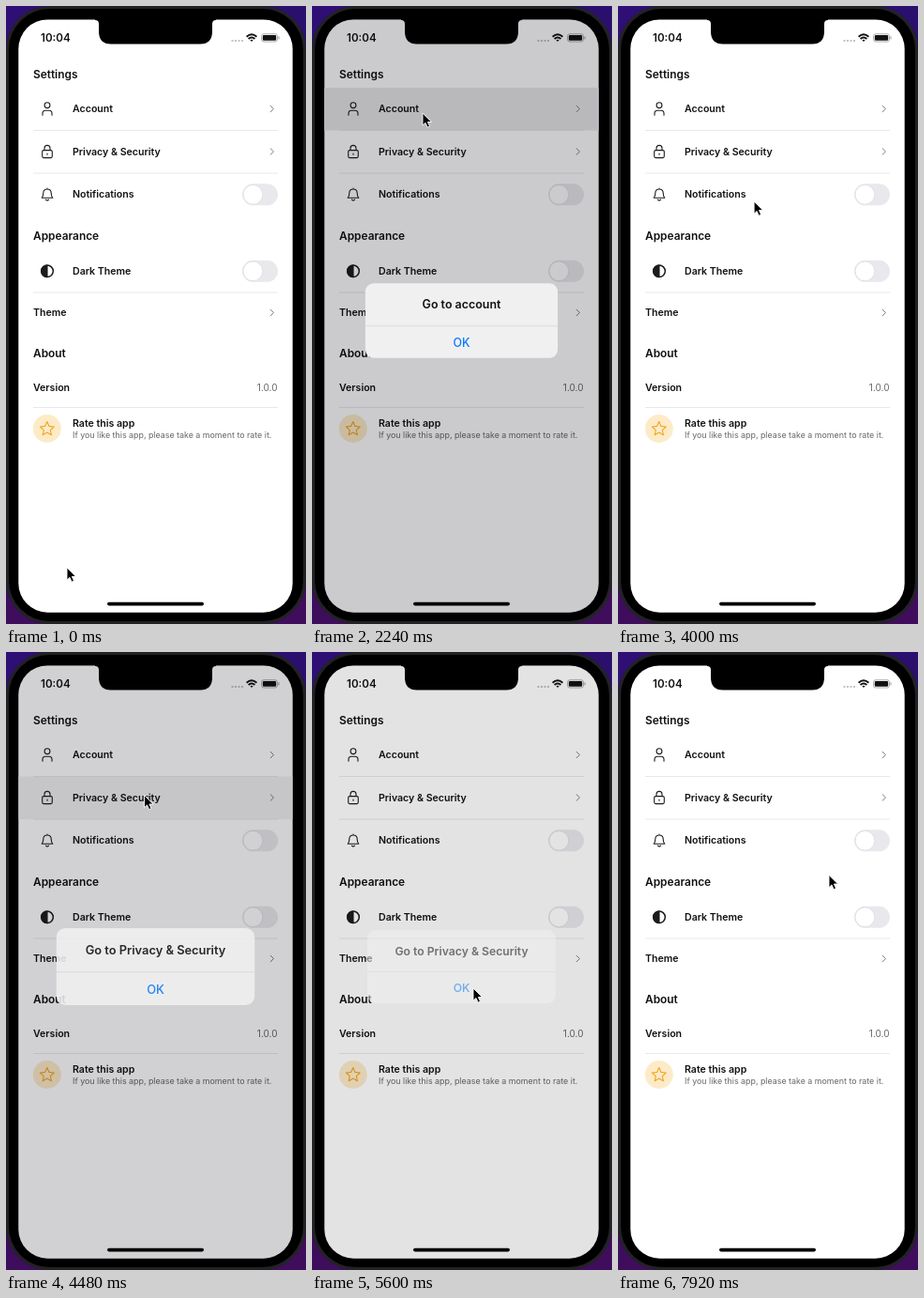
An HTML page that plays this animation: 320x658 px, repeating every 8000 ms.

```html
<!DOCTYPE html>
<html lang="en">
<head>
<meta charset="utf-8">
<title>Settings screen</title>
<style>
html, body { margin: 0; height: 100%; overflow: hidden; background: #000; }
svg { display: block; width: 320px; height: 658px; }
text { font: 600 10.6px Inter, "Open Sans", sans-serif; fill: #111; }
.head { font-size: 11.9px; }
.small { font-size: 8.87px; font-weight: 400; fill: #66666c; }
.mid { text-anchor: middle; font-size: 12.2px; }
.line { stroke: #e6e6ea; stroke-width: .9; }
.icon { fill: none; stroke: #1c1c1e; stroke-width: 1.1; stroke-linecap: round; stroke-linejoin: round; }
#dim { mix-blend-mode: multiply; }
</style>
</head>
<body>
<svg viewBox="0 0 320 658">
  <defs>
    <linearGradient id="back" x2="0.2" y2="1">
      <stop stop-color="#2f0f75"/><stop offset=".5" stop-color="#250f62"/><stop offset="1" stop-color="#400d5c"/>
    </linearGradient>
    <g id="chevron"><path class="icon" style="stroke:#808084;stroke-width:1" d="M-1.8-3.2L1.5 0L-1.8 3.2"/></g>
    <g id="toggle">
      <rect x="-19" y="-11.5" width="38" height="23" rx="11.5" fill="#e9e9ed"/>
      <circle cx="-7.6" r="10.4" fill="#fff" stroke="#d9d9de" stroke-width=".7"/>
    </g>
  </defs>

  <rect width="320" height="658" fill="url(#back)"/>
  <rect x="1.5" y="1.5" width="317" height="655" rx="45" stroke="#222225" stroke-width="3"/>
  <rect x="13.3" y="14.5" width="292.4" height="631.2" rx="31" fill="#fff"/>

  <rect id="glow" x="13.3" width="292.4" height="45.5" fill="#e9e9e9"/>

  <text class="head" x="29" y="76.8">Settings</text>
  <text x="71" y="113.3">Account</text>
  <text x="71" y="158.6">Privacy &amp; Security</text>
  <text x="71" y="204.2">Notifications</text>
  <text class="head" x="29" y="249.2">Appearance</text>
  <text x="71" y="285.7">Dark Theme</text>
  <text x="29" y="330.2">Theme</text>
  <text class="head" x="29" y="374">About</text>
  <text x="29" y="409.6">Version</text>
  <text x="289.5" y="409.6" text-anchor="end" style="font-size:10px;font-weight:400;fill:#66666c">1.0.0</text>
  <text x="71" y="448.3">Rate this app</text>
  <text class="small" x="71" y="459.8">If you like this app, please take a moment to rate it.</text>

  <path class="line" d="M29 132.5H290M29 178H290M29 305H290M29 427.5H290"/>
  <use href="#chevron" x="284" y="109.5"/>
  <use href="#chevron" x="284" y="155"/>
  <use href="#chevron" x="284" y="326.5"/>
  <use href="#toggle" x="271" y="200.8"/>
  <use href="#toggle" x="271" y="282.3"/>

  <g class="icon">
    <circle cx="44" cy="105.7" r="2.9"/>
    <path d="M39 116.3V114.5Q39 111.3 42 111.3H46Q49 111.3 49 114.5V116.3"/>
    <rect x="38.7" y="153.6" width="10.6" height="8" rx="1.5"/>
    <path d="M41 153.3V151.4a3 3 0 0 1 6 0V153.3M44 157V158.2"/>
    <path d="M38.2 204.3Q39.8 202.6 39.8 199.3Q39.8 195 44 195Q48.2 195 48.2 199.3Q48.2 202.6 49.8 204.3ZM42.4 206.2Q44 208 45.6 206.2M44 194V195"/>
    <circle cx="44" cy="282.3" r="6.3" stroke-width="1.5"/>
    <path d="M44 276a6.3 6.3 0 0 0 0 12.6Z" fill="#1c1c1e"/>
  </g>
  <circle cx="43.8" cy="450" r="15" fill="#fdebc8"/>
  <path id="star" class="icon" style="stroke:#f2a51f"/>

  <text x="37" y="38" style="font-size:11.6px">10:04</text>
  <path d="M240.5 37H253" stroke="#b0b0b4" stroke-width="1.6" stroke-dasharray="2 1.5"/>
  <g fill="none" stroke="#111" stroke-width="1.9">
    <path d="M256.6 32.7Q262 28 267.4 32.7M258.6 35Q262 32 265.4 35"/>
    <path d="M260.4 36.3Q262 35 263.6 36.3L262 38Z" fill="#111" stroke="none"/>
  </g>
  <rect x="272.5" y="29.8" width="17" height="8.2" rx="2.4" fill="none" stroke="#98989c" stroke-width=".8"/>
  <rect x="273.8" y="31.1" width="14.4" height="5.6" rx="1.3" fill="#111"/>
  <path d="M291 32.4V35.4" stroke="#98989c"/>

  <rect id="dim" x="13.3" y="14.5" width="292.4" height="631.2" rx="31" fill="#cbcbcd"/>
  <path d="M95 13V15Q99 15 99 19V27Q99 40.5 112 40.5H207Q220 40.5 220 27V19Q220 15 224 15V13Z"/>
  <rect x="108" y="634.8" width="103" height="3.6" rx="1.8"/>

  <g id="alert">
    <rect x="-100.5" y="-39" width="201" height="78" rx="9" fill="#f0f0f1"/>
    <path id="ok" d="M-100.5 5.5H100.5V30Q100.5 39 91.5 39H-91.5Q-100.5 39-100.5 30Z" fill="#d6d6d8"/>
    <path d="M-100.5 5.5H100.5" stroke="#d8d8db" stroke-width=".8"/>
    <text id="title" class="mid" y="-12.3"></text>
    <text class="mid" y="27.2" style="font-weight:500;fill:#0a7aff">OK</text>
  </g>

  <circle id="touch" r="15" fill="#77777a" fill-opacity=".45" stroke="#77777a" stroke-opacity=".5"/>
  <path id="cursor" d="M0 0V13.2L3 10.4L5.1 15.2L7.5 14.1L5.4 9.5H9.6Z" stroke="#fff" stroke-width=".9"/>
</svg>

<script>
const LOOP = 8000;
const $ = id => document.getElementById(id);
const clamp = v => Math.max(0, Math.min(1, v));
const smooth = v => v * v * (3 - 2 * v);

// Cursor moves: start, end, x, y
const start = [65, 598];
const moves = [
  [350, 1650, 118, 114],
  [2650, 3450, 139, 351],
  [3760, 4130, 147.5, 152.5],
  [4720, 5250, 172, 358],
  [5600, 6100, 144, 202],
  [6850, 7600, 225, 237.5]
];
const presses = [[1880, 2040], [3580, 3700], [4170, 4320], [5290, 5400], [6180, 6350]];
// Lit rows: start, fade start, top
const rows = [[1880, 2250, 87], [4170, 4400, 132.5], [6180, 6350, 178]];
// Alerts: open, OK pressed, close, text
const alerts = [
  [2040, 3580, 3700, "Go to account"],
  [4350, 5310, 5500, "Go to Privacy & Security"]
];

const star = Array.from({ length: 10 }, (_, i) => {
  const r = i % 2 ? 3.7 : 7.8, a = i * Math.PI / 5;
  return [43.8 + r * Math.sin(a), 450.4 - r * Math.cos(a)];
});
$("star").setAttribute("d", "M" + star.join("L") + "Z");

function cursorAt(t) {
  let [x, y] = start;
  for (const [a, b, nx, ny] of moves) {
    const k = smooth(clamp((t - a) / (b - a)));
    x += (nx - x) * k;
    y += (ny - y) * k;
  }
  return [x, y];
}

function draw(t) {
  const [x, y] = cursorAt(t);
  $("cursor").setAttribute("transform", `translate(${x} ${y})`);
  $("touch").setAttribute("transform", `translate(${x} ${y + 1})`);
  $("touch").style.opacity = presses.some(([a, b]) => t >= a && t < b) ? 1 : 0;

  const row = rows.find(([a, b]) => t >= a && t < b + 200);
  $("glow").style.opacity = row ? 1 - clamp((t - row[1]) / 200) : 0;
  if (row) $("glow").setAttribute("y", row[2]);

  const alert = alerts.find(([a, , c]) => t >= a && t < c + 220);
  let shade = 0;
  if (alert) {
    const [open, press, close, text] = alert;
    const out = 1 - clamp((t - close) / 220);
    const scale = 1 + 0.17 * (1 - clamp((t - open) / 400)) ** 3;
    shade = clamp((t - open) / 150) * out;
    $("title").textContent = text;
    $("ok").style.opacity = t >= press && t < close ? 1 : 0;
    $("alert").setAttribute("transform", `translate(159.5 335) scale(${scale})`);
  }
  $("alert").style.opacity = $("dim").style.opacity = shade;
}

function tick() {
  draw(performance.now() % LOOP);
  requestAnimationFrame(tick);
}
tick();
</script>
</body>
</html>
```
